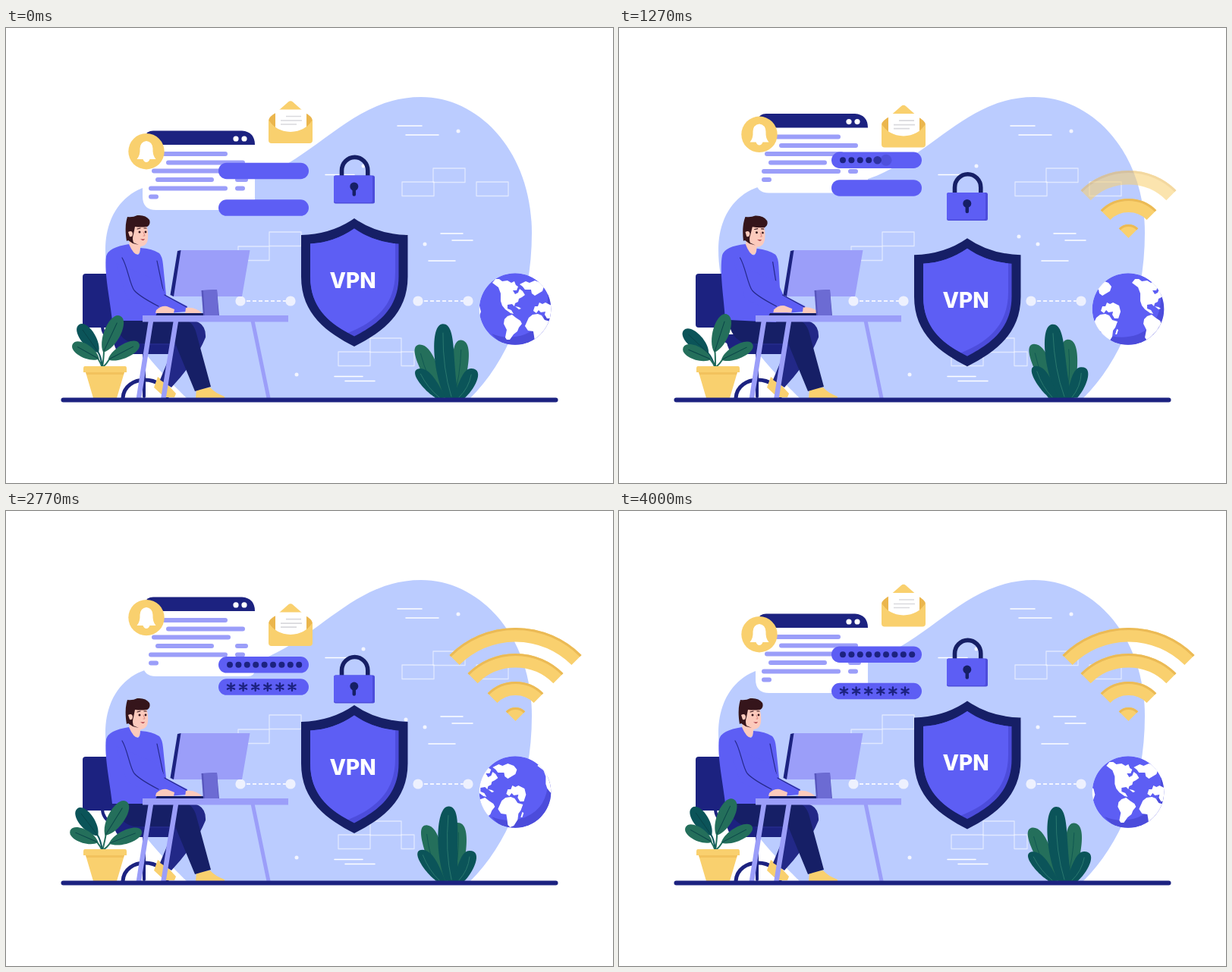
An HTML page for the animation above (4030 ms loop, 800 px wide and 600 px high).

```html
<!DOCTYPE html>
<html lang="en">
<head>
<meta charset="utf-8">
<title>VPN illustration</title>
<style>
  html, body { margin: 0; width: 100%; height: 100%; overflow: hidden; background: #fff; }
  svg { display: block; width: 800px; height: 600px; }
  .navy { fill: #1c2280; }
  .ink { fill: #161f66; }
  .blue { fill: #5d5ef4; }
  .shade { fill: #4c4cdb; }
  .lilac { fill: #9b9ef9; }
  .gold { fill: #f9d06e; }
  .amber { fill: #ebb64d; }
  .skin { fill: #fccabc; }
  .white { fill: #fff; }
  .line { fill: none; stroke-linecap: round; stroke-linejoin: round; }
  .label { font: 800 28px Inter, "Open Sans", sans-serif; fill: #fff; text-anchor: middle; }
</style>
</head>
<body>
<svg viewBox="0 0 800 600">
  <defs>
    <clipPath id="disc"><circle cx="671" cy="370.5" r="47.3"/></clipPath>
    <g id="land" class="white">
      <path d="M641 336 L645 331 650 331 654 334 661 333 666 336 670 334 672 339 675 341 673 346 668 346 671 351 675 349 677 344 681 347 684 352 680 355 676 357 675 361 671 363 670 367 667 364 661 365 661 370 666 372 669 377 665 376 658 371 654 366 652 360 652 350 649 342 Z"/>
      <path d="M661 380 L667 378 672 382 678 386 680 390 676 395 674 400 669 404 664 411 660 411 658 408 660 398 656 390 657 384 Z"/>
      <path d="M677 338 L685 334 690 336 697 333 705 336 709 341 707 347 702 350 697 353 693 350 692 345 684 345 681 341 Z"/>
      <path d="M689 382 L694 378 701 377 706 379 710 385 717 387 714 395 711 399 710 407 705 415 700 417 697 414 696 406 695 400 688 399 684 393 Z"/>
      <path d="M695 373 L697 367 701 367 703 362 707 364 711 362 719 366 721 374 718 383 713 383 710 378 711 374 705 375 702 372 699 376 Z"/>
      <path d="M671 367 l5 1 l3 2 l-3 1z M716 397 l2 1 l-2 6 l-2 0z"/>
    </g>
  </defs>

  <path fill="#bbccff" d="M612 488 H238 C190 440 131 380 131 292 C131 245 158 211 200 206 C255 201 300 216 350 190 C420 157 465 91 547 91 C625 91 693 165 693 270 C693 365 660 440 612 488Z"/>
  <g id="deco" class="line" stroke="#fff" stroke-width="1.3"></g>
  <g id="links"></g>

  <g id="chair">
    <rect class="navy" x="101" y="324" width="44" height="71" rx="4"/>
    <path class="line" stroke="#1c2280" stroke-width="4" d="M127 393 C127 410 145 418 182 424 V486"/>
    <path class="line" stroke="#1c2280" stroke-width="5" d="M154 488 C156 456 210 456 212 488"/>
    <path class="navy" d="M140 404 H245 V420 Q240 430 225 430 H152 Q143 428 140 404Z"/>
  </g>

  <g id="legs">
    <path class="gold" d="M200 460 L213 470 224 482 222 487 H209 L195 474Z"/>
    <path fill="#222887" d="M190 386 H248 Q264 390 263 408 Q250 440 218 474 L203 464 L222 418 H180Z"/>
    <path class="gold" d="M251 476 L269 474 Q275 481 288 486 V488 H250Z"/>
    <path class="ink" d="M144 384 H232 Q247 386 251 403 L270 473 249 479 223 416 H168 Q147 411 144 384Z"/>
  </g>

  <g id="torso">
    <path class="skin" d="M163 279 L178 283 176 297 170 299 162 288Z"/>
    <path class="skin" d="M162 263 Q170 254 184 258 Q188 267 187 278 Q186 287 178 288 Q166 287 164 275Z"/>
    <path fill="#35151b" d="M159 281 C157 269 157 258 160 249 Q167 250 173 247 Q184 246 189 253 Q191 259 186 262 Q177 263 170 262 L168 272 Q166 278 168 283 L175 286 167 284 161 280Z"/>
    <path class="skin" d="M161 269 Q166 266 167 271 Q167 276 163 275Z"/>
    <path class="line" stroke="#35151b" stroke-width="1.2" d="M173 265 l4 -1 M182 264 l3 0"/>
    <path class="line" stroke="#d98880" stroke-width="1" d="M181 269 l2 5 l-2 0"/>
    <circle cx="176" cy="269" r="1.5" fill="#35151b"/><circle cx="184" cy="269" r="1.4" fill="#35151b"/>
    <path fill="#a02a37" d="M177 278 Q180 279 183 278 Q181 282 177 278Z"/>
    <path class="blue" d="M162 285 Q168 299 174 299 Q177 297 177 290 Q193 291 202 297 Q206 301 207 312 L211 352 207 386 H140 C137 358 129 322 132 301 Q135 289 162 285Z"/>
    <path class="line" stroke="#25298a" stroke-width="1.2" d="M199 307 L208 350"/>
  </g>
  <g id="arms">
    <path class="blue" d="M145 310 L202 334 210 352 239 367 237 374 203 377 160 358Z"/>
    <path class="line" stroke="#25298a" stroke-width="1.2" d="M153 303 C160 314 163 338 169 346 Q176 354 201 367 M209 352 L238 368"/>
  </g>
  <path id="handL" class="skin" d="M198 372 Q204 366 212 367 L222 371 221 376 H197Z"/>
  <path id="handR" class="skin" d="M237 369 Q245 368 251 371 L258 375 256 377 H236Z"/>

  <path class="ink" d="M199 376 H260 V380 H197Z"/>
  <path class="lilac" d="M229 293 H321.5 L311 354 H219Z"/>
  <path class="navy" d="M226 294 L230.500 293 221 354 216.500 352Z"/>
  <path fill="#5756bd" d="M257.500 346 L278 345 281 380 H260Z"/>
  <path fill="#6c6bd3" d="M260 346 L278 345 280 380 262 380Z"/>
  <g class="line" stroke="#9b9ef9" stroke-linecap="butt">
    <path stroke-width="6.500" d="M191 386 L175 488 M224 386 L207.500 488"/>
    <path stroke-width="5" d="M325 386 L346 488"/>
  </g>
  <rect class="lilac" x="180" y="379" width="192" height="8.500"/>

  <g id="plant"></g>
  <path class="gold" d="M104 446 H157 Q159 446 159 449 V454 H156 L146 488 H115 L105 454 H102 V449 Q102 446 104 446Z"/>
  <path class="amber" d="M105 454 H156 L155 457 H106Z" opacity=".5"/>
  <g id="agave"></g>
  <path class="line" stroke="#1c2280" stroke-width="6" d="M75.500 490.500 H724.500"/>

  <g id="window">
    <path class="white" d="M180 150 H328 V232 Q327 240 319 240 H198 Q180 240 180 222Z"/>
    <path class="navy" d="M183 154 V143 Q185 135.500 194 135.500 H311 Q328 137 328 154Z"/>
    <circle class="white" cx="303" cy="146" r="3.600"/><circle class="white" cx="314" cy="146" r="3.600"/>
    <path class="line" stroke="#9b9ef9" stroke-width="6" d="M209 166 H289 M214 177.500 H312 M195 188.500 H293 M200 200 H271 M305 200 H316 M191 211.500 H289 M305 211.500 H312 M191 222.500 H198"/>
    <circle class="gold" cx="185" cy="162.700" r="23.700"/>
    <path class="white" d="M185 149 Q193 150 193.500 159 Q193 168 197.500 173 H189.500 Q188 177 185 177 Q182 177 180.500 173 H172.500 Q177 168 176.500 159 Q177 150 185 149Z"/>
  </g>

  <g id="envelope">
    <path class="amber" d="M346 122 Q346 117 357 111 H393 Q404 117 404 122 L390 140 H360Z"/>
    <path class="gold" d="M359 109 L372 97.500 Q375 95 378 97.500 L391 109Z"/>
    <path class="white" d="M355 107.500 H396 V134 Q375 143 355 134Z"/>
    <path fill="none" stroke="#d9d9dd" stroke-width="1.600" d="M369 116.500 H389 M362 122 H390 M362 127 H383"/>
    <path class="gold" d="M346 121 Q355 136 375 137 Q395 136 404 121 V148 Q404 152 400 152 H350 Q346 152 346 148Z"/>
  </g>

  <g id="pill1"><rect class="blue" x="280" y="177.700" width="119" height="21.500" rx="10.750"/></g>
  <g id="pill2"><rect class="blue" x="280" y="226.300" width="119" height="21.500" rx="10.750"/></g>

  <g id="shield">
    <path class="ink" d="M459 251 Q489 272 529.500 273 V328 C529.500 378 494 402 459 420 C424 402 389 378 389 328 V273 Q429 272 459 251Z"/>
    <path class="shade" d="M459 264.500 Q486 283 517.500 284.500 V328 C517.500 372 487 392 459 406.500 C431 392 401 372 401 328 V284.500 Q432 283 459 264.500Z"/>
    <path class="blue" d="M459 264.500 Q480 280 513 284.300 V322 C513 366 486 388 451 402 C425 388 401 368 401 328 V284.500 Q432 283 459 264.500Z"/>
    <text class="label" x="457" y="343">VPN</text>
  </g>

  <g id="lock">
    <path class="line" stroke="#161f66" stroke-width="5.600" stroke-linecap="butt" d="M442.500 195 V188 A17 17.500 0 0 1 476.800 188 V195"/>
    <rect class="shade" x="432" y="194.500" width="54" height="37" rx="2.500"/>
    <rect class="blue" x="432" y="194.500" width="51" height="35.500" rx="2.500"/>
    <circle class="ink" cx="458.800" cy="209" r="5.500"/><path class="line" stroke="#161f66" stroke-width="4.500" d="M458.800 210 V219.500"/>
  </g>

  <g id="wifi"></g>

  <g clip-path="url(#disc)">
    <circle class="blue" cx="671" cy="370.500" r="47.300"/>
    <path class="shade" d="M712 335 Q722 388 684 404 Q660 412 640 403 L660 425 H725 V335Z"/>
    <g id="spin"><use href="#land" x="-95"/><use href="#land"/><use href="#land" x="95"/></g>
  </g>
</svg>
<script>
const LOOP = 4030, NS = 'http://www.w3.org/2000/svg';
const $ = id => document.getElementById(id);
const clamp = v => Math.max(0, Math.min(1, v));
const smooth = v => { v = clamp(v); return v * v * (3 - 2 * v); };
const wave = (t, peak) => Math.cos(2 * Math.PI * (t - peak) / LOOP);

function add(parent, tag, attrs) {
  const el = document.createElementNS(NS, tag);
  for (const k in attrs) el.setAttribute(k, attrs[k]);
  return parent.appendChild(el);
}

// Backdrop marks
const boxes = [[522, 203, 42], [563, 185, 42], [620, 203, 42], [306, 288, 41], [347, 269, 42], [438, 427, 42], [480, 409, 41], [521, 427, 17]];
for (const [x, y, w] of boxes)
  add($('deco'), 'rect', { x, y, width: w, height: 18.5, opacity: .55 });
const dashes = [[516, 129, 32], [527, 141, 43], [573, 271, 29], [588, 280, 27], [557, 307, 35], [433, 459.5, 37], [447, 465.5, 39], [421, 193.5, 38]];
for (const [x, y, w] of dashes) add($('deco'), 'path', { d: `M${x} ${y}h${w}`, 'stroke-width': 1.5 });
for (const [cx, cy] of [[596, 136], [552, 285], [383, 457], [471, 182], [527, 275]])
  add($('deco'), 'circle', { cx, cy, r: 2.5, fill: '#f3f5ff', stroke: 'none' });

for (const x of [309, 543]) {
  add($('links'), 'path', { d: `M${x} 360h66`, stroke: '#f3f5ff', 'stroke-width': 1.8, 'stroke-dasharray': '5 3' });
  for (const cx of [x, x + 66]) add($('links'), 'circle', { cx, cy: 360, r: 6.6, fill: '#eef1fe' });
}

// Leaves: each sways around its root
const DARK = '#0b5459', GREEN = '#246f5b';
const sways = [];

function potLeaf(x, y, angle, len, w, fill, amp, peak) {
  const g = add($('plant'), 'g', {});
  add(g, 'path', { class: 'line', d: `M127 448 Q${(127 + x) / 2 + 1} ${y + 6} ${x} ${y}`, stroke: fill, 'stroke-width': 2 });
  const blade = add(g, 'g', { transform: `translate(${x} ${y}) rotate(${angle})` });
  add(blade, 'path', { fill, d: `M0 2C${-w} ${-len * .2} ${-w} ${-len} 0 ${-len}C${w} ${-len} ${w} ${-len * .2} 0 2Z` });
  add(blade, 'path', { class: 'line', d: `M0 0V${-len * .8}`, stroke: '#0a4348', 'stroke-width': .9 });
  sways.push([g, 127, 448, amp, peak]);
}
potLeaf(129, 426, 25, 51, 14.5, GREEN, 7.5, 3022);
potLeaf(119, 427, -40, 43, 13, DARK, 7, -510);
potLeaf(120, 436, -65, 38, 12, GREEN, 4.5, 0);
potLeaf(137, 437, 65, 44, 12, GREEN, 4, 2515);

function agaveLeaf(d, vein, fill, x, amp, peak) {
  const g = add($('agave'), 'g', {});
  add(g, 'path', { d, fill });
  add(g, 'path', { class: 'line', d: vein, stroke: fill === DARK ? '#2d7c70' : '#0f5652', 'stroke-width': .9 });
  sways.push([g, x, 487, amp, peak]);
}
agaveLeaf('M566 488C556 465 530 417 549 416C566 416 574 452 582 488Z', 'M550 428Q556 460 572 486', GREEN, 574, 4.8, 2515);
agaveLeaf('M582 488C588 455 580 411 595 411C614 411 606 458 599 488Z', 'M596 424Q597 460 590 486', GREEN, 590, 3.8, -300);
agaveLeaf('M579 488C563 455 559 390 577 390C596 390 588 440 597 488Z', 'M577 402Q576 450 587 486', DARK, 587, 4.1, 2910);
agaveLeaf('M568 488C556 482 530 448 548 447C562 447 571 468 579 488Z', 'M549 454Q557 474 571 487', DARK, 572, 5, 1850);
agaveLeaf('M589 488C596 467 600 448 611 448C630 448 615 478 604 488Z', 'M611 456Q609 474 597 487', DARK, 597, 4.4, -250);

// Password marks
const marks = [];
const mark = (pill, x, y, start) => {
  const g = add($(pill), 'g', {});
  marks.push({ g, x, y, start });
  return g;
};
for (let i = 0; i < 9; i++)
  add(mark('pill1', 295 + 11.4 * i, 188.5, 730 + 100 * i), 'circle', { r: 4, class: 'navy' });
for (let i = 0; i < 6; i++)
  add(mark('pill2', 296.5 + 16.1 * i, 237, 1630 + 100 * i), 'path',
    { class: 'line', stroke: '#1c2280', 'stroke-width': 2.3, d: 'M0 -5V5M-4.600 -2.600L4.600 2.600M-4.600 2.600L4.600 -2.600' });

// Signal arcs: [outer radius, thickness, start]
const signal = [[18, 18, 200], [52, 18, 640], [89, 18.5, 1160], [123, 18.5, 1740]].map(([r, w, start]) => {
  const g = add($('wifi'), 'g', {});
  const arc = (outer, width, color) => {
    const m = outer - width / 2, k = m * Math.SQRT1_2;
    add(g, 'path', { fill: 'none', stroke: color, 'stroke-width': width, d: `M${671.5 - k} ${277 - k}A${m} ${m} 0 0 1 ${671.5 + k} ${277 - k}` });
  };
  arc(r, w, '#f9d06e');
  arc(r, 3, '#ebba55');
  return { g, start };
});

// Floating parts: [id, amplitude, time of lowest point]
const floats = [['window', 16, 0], ['envelope', 16, 2515], ['pill1', 15.5, 3022], ['pill2', 16, -510], ['lock', 16, 2015], ['shield', 16, 1505]];
const move = (id, x, y) => $(id).setAttribute('transform', `translate(${x} ${y})`);

function draw(t) {
  for (const [id, amp, peak] of floats) move(id, 0, amp * (wave(t, peak) - wave(0, peak)));
  for (const [g, x, y, amp, peak] of sways)
    g.setAttribute('transform', `rotate(${amp * wave(t, peak)} ${x} ${y})`);
  for (const { g, x, y, start } of marks) {
    const p = clamp((t - start) / 200);
    g.setAttribute('opacity', p);
    g.setAttribute('transform', `translate(${x} ${y}) scale(${2.1 - 1.1 * p})`);
  }
  for (const { g, start } of signal) g.setAttribute('opacity', clamp((t - start) / 200));
  move('spin', -(190 * t / LOOP % 95), 0);

  const lean = smooth((t - 450) / 350) * (1 - smooth((t - 1880) / 320));
  const tap = 1.8 * Math.sin(2 * Math.PI * (t - 770) / 320) * lean;
  $('torso').setAttribute('transform', `rotate(${2.7 * lean} 165 386)`);
  move('arms', 6.5 * lean, 0);
  move('handL', 7 * lean + tap, -.8 * lean);
  move('handR', 5 * lean - tap, -.5 * lean);
}

const begin = performance.now();
function tick() {
  draw((performance.now() - begin) % LOOP);
  requestAnimationFrame(tick);
}
tick();
</script>
</body>
</html>
```
